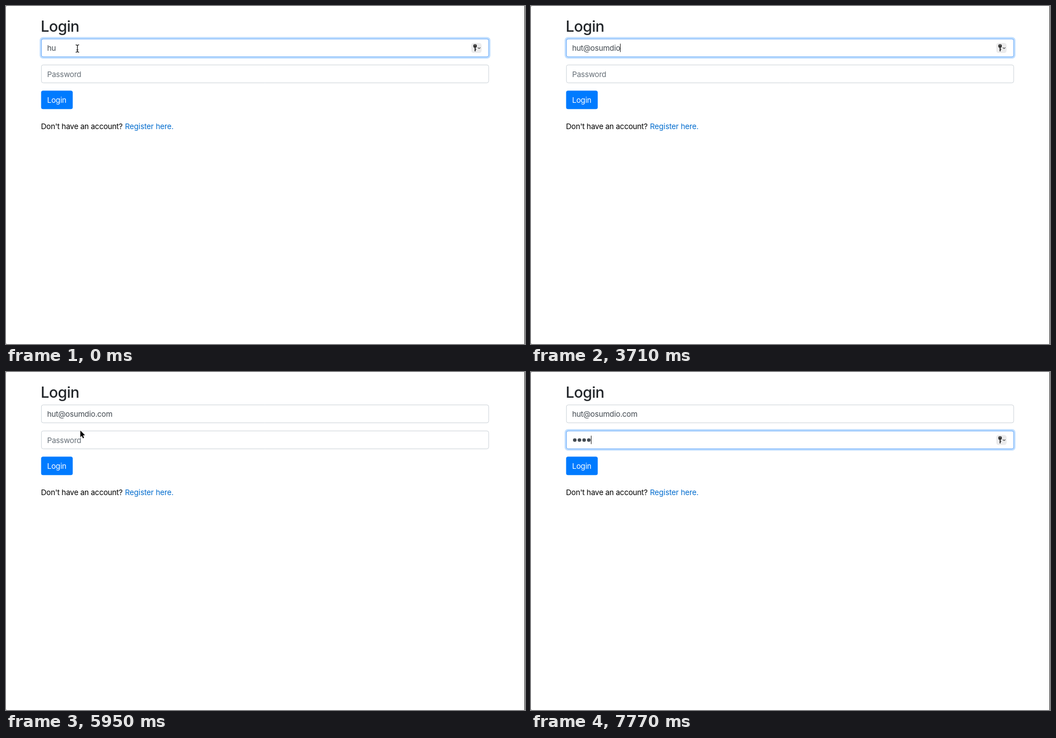
Recreate the animation shown at these times as an HTML page with a canvas. Size 927 by 604 pixels, loop 8000 ms.

```html
<!DOCTYPE html>
<html lang="en">
<head>
<meta charset="utf-8">
<title>Login</title>
<style>
html, body { margin: 0; width: 100%; height: 100%; overflow: hidden; background: #fff; }
canvas { display: block; width: 927px; height: 604px; }
</style>
</head>
<body>
<canvas id="stage" width="927" height="604"></canvas>
<script>
const ctx = document.getElementById('stage').getContext('2d');
const LOOP = 8000, TICK = 70;
const FAMILY = 'Inter, "Open Sans", sans-serif';
const EMAIL = 'hut@osumdio.com';
const INK = '#434a51';
const LEFT = 62.8, WIDTH = 799.8, HEIGHT = 33;
const EMAIL_Y = 58.3, PASS_Y = 104.8;
const BLUR = 5600, FOCUS = 6020, MENU = 6090;

// a run of evenly spaced key presses
const burst = (start, count, gap) => Array.from({ length: count }, (_, i) => start + i * gap);
const emailKeys = [burst(-990, 2, 0), burst(840, 3, 770), burst(2450, 3, 420),
  burst(3500, 3, 105), burst(3850, 4, 163)].flat();
const passKeys = burst(6830, 4, 310);
const moves = [0, 5110, 7000, 7350];

const ramp = (t, a, b) => Math.min(1, Math.max(0, (t - a) / (b - a)));
const before = (times, t) => times.filter(k => k <= t);
const latest = (times, t) => Math.max(...before(times, t));
const bend = (a, b, c, u) => (1 - u) ** 2 * a + 2 * u * (1 - u) * b + u * u * c;

// solid after a key, then a soft blink
const blink = age => 1 - ramp(age, 490, 700) + ramp(age, 1200, 1410);

function box(x, y, w, h, r, fill) {
  ctx.beginPath();
  ctx.roundRect(x, y, w, h, r);
  if (fill) {
    ctx.fillStyle = fill;
    ctx.fill();
  }
}

function stroke(color, width) {
  ctx.strokeStyle = color;
  ctx.lineWidth = width;
  ctx.stroke();
}

function disc(x, y, r, color) {
  box(x - r, y - r, 2 * r, 2 * r, r, color);
}

function text(str, x, y, color, size = 13.5, spacing = -.2, weight = 400) {
  ctx.font = `${weight} ${size}px ${FAMILY}`;
  ctx.letterSpacing = spacing + 'px';
  ctx.fillStyle = color;
  ctx.fillText(str, x, y);
  return x + ctx.measureText(str).width;
}

function field(y, focus) {
  if (focus > 0) {
    box(LEFT - 2.7, y - 2.7, WIDTH + 5.4, HEIGHT + 5.4, 6, `rgba(0,123,255,${.25 * focus})`);
  }
  box(LEFT, y, WIDTH, HEIGHT, 3.5, '#fff');
  const edge = Math.min(1, focus * 1.6);
  const mix = (a, b) => a + (b - a) * edge;
  box(LEFT + .5, y + .5, WIDTH - 1, HEIGHT - 1, 3.2);
  stroke(`rgb(${mix(206, 118)},${mix(212, 178)},${mix(218, 250)})`, 1 + .2 * edge);
}

function keyIcon(y) {
  box(831, y + 7.7, 18.5, 18, 4.5, '#ebebec');
  disc(837.8, y + 13.2, 3.2, '#333');
  box(836.9, y + 15, 1.9, 7.6, .5, '#333');
  box(838, y + 18.4, 1.9, 1.6, .3, '#333');
  disc(837.8, y + 11.8, .7, '#ebebec');
  ctx.beginPath();
  ctx.moveTo(842.7, y + 16);
  ctx.lineTo(845, y + 17.8);
  ctx.lineTo(847.3, y + 16);
  stroke('#444', 1.1);
}

function caret(x, y, alpha) {
  ctx.fillStyle = `rgba(0,0,0,${.85 * alpha})`;
  ctx.fillRect(Math.round(x), y + 9, 1, 15);
}

function fade(x0, x1, ...colors) {
  const g = ctx.createLinearGradient(x0, 150, x1, 160);
  colors.forEach((c, i) => g.addColorStop(i / (colors.length - 1), c));
  return g;
}

function menu(alpha) {
  ctx.save();
  ctx.globalAlpha = alpha;
  ctx.shadowColor = 'rgba(0,0,0,.3)';
  ctx.shadowBlur = 17;
  ctx.shadowOffsetY = 3;
  box(56.5, 139, 147.5, 51, 6, fade(57, 204, '#2c4a78', '#4a5566', '#626262'));
  ctx.shadowColor = 'transparent';
  box(57, 139.5, 146.5, 50, 5.5);
  stroke('rgba(140,140,140,.45)', 1);
  box(63, 146, 135.5, 18.8, 3.5, fade(63, 198, '#e968a4', '#ea6da7', '#ef7db2'));
  text('Passwords...', 68.5, 159, '#fff', 11, -.04);
  text('Suggest New Password', 68.5, 178, '#fff', 11, -.04);
  ctx.restore();
}

function arrow() {
  ctx.stroke(new Path2D());
  const shape = new Path2D('M0 0V11.8L2.7 9.3L4.6 13.8L6.6 13L4.7 8.6L8.3 8.4Z');
  ctx.strokeStyle = '#fff';
  ctx.lineWidth = 1.6;
  ctx.stroke(shape);
  ctx.fillStyle = '#000';
  ctx.fill(shape);
}

function iBeam() {
  ctx.beginPath();
  for (const s of [-1, 1]) {
    ctx.moveTo(-3, 6.6 * s);
    ctx.quadraticCurveTo(0, 6.6 * s, 0, 4.6 * s);
    ctx.quadraticCurveTo(0, 6.6 * s, 3, 6.6 * s);
  }
  ctx.moveTo(0, -5);
  ctx.lineTo(0, 5);
  ctx.moveTo(-1.8, 2.5);
  ctx.lineTo(1.8, 2.5);
  stroke('#111', 1.2);
}

// typing hides the pointer until it moves again
function pointer(t) {
  if (latest([...emailKeys, ...passKeys], t) > latest(moves, t)) return;
  const first = ramp(t, 5110, 5460), second = ramp(t, 5810, 6650);
  const x = second ? bend(133, 130.6, 148, second) : bend(127.5, 113, 133, first);
  const y = second ? bend(102.5, 108, 122.5, second) : bend(76, 87, 102.5, first);
  const inside = [EMAIL_Y, PASS_Y].some(top => y > top && y < top + HEIGHT);
  ctx.save();
  ctx.translate(x, y);
  inside ? iBeam() : arrow();
  ctx.restore();
}

function draw(t) {
  ctx.fillStyle = '#fff';
  ctx.fillRect(0, 0, 927, 604);

  text('Login', 61.9, 45.5, '#212529', 27, -.5, 500);
  field(EMAIL_Y, 1 - ramp(t, BLUR - TICK, BLUR + 2 * TICK));
  field(PASS_Y, ramp(t, FOCUS - 30, FOCUS + 2 * TICK));
  if (t < BLUR) keyIcon(EMAIL_Y);
  if (t >= MENU) keyIcon(PASS_Y);

  const end = text(EMAIL.slice(0, before(emailKeys, t).length), 73.5, 80, INK);
  if (t < BLUR) caret(end - .5, EMAIL_Y, blink(t - latest(emailKeys, t)));

  const dots = before(passKeys, t).length;
  if (!dots) text('Password', 73.5, 126.5, '#666f77');
  for (let i = 0; i < dots; i++) disc(78.2 + i * 8.35, 121.6, 3.2, INK);
  if (t >= FOCUS) caret(74 + dots * 8.35, PASS_Y, blink(t - latest([FOCUS, ...passKeys], t)));

  box(62.7, 151.3, 56.5, 33, 3.5, '#007bff');
  text('Login', 73.5, 173, '#fff');
  text("Don't have an account?", 62.5, 220, '#000');
  text('Register here.', 212.5, 220, '#006cce', 13.5, -.13);

  const shown = ramp(t, FOCUS, MENU) - ramp(t, 6790, 7000);
  if (shown > 0) menu(shown);
  pointer(t);

  // window edge
  ctx.fillStyle = '#333';
  ctx.fillRect(926, 0, 1, 604);
  ctx.fillStyle = '#999';
  ctx.fillRect(0, 0, 1, 1);
  ctx.fillRect(0, 603, 1, 1);
}

function loop() {
  const t = performance.now() % LOOP;
  draw(Math.floor(t / TICK) * TICK);
  requestAnimationFrame(loop);
}
loop();
</script>
</body>
</html>
```
